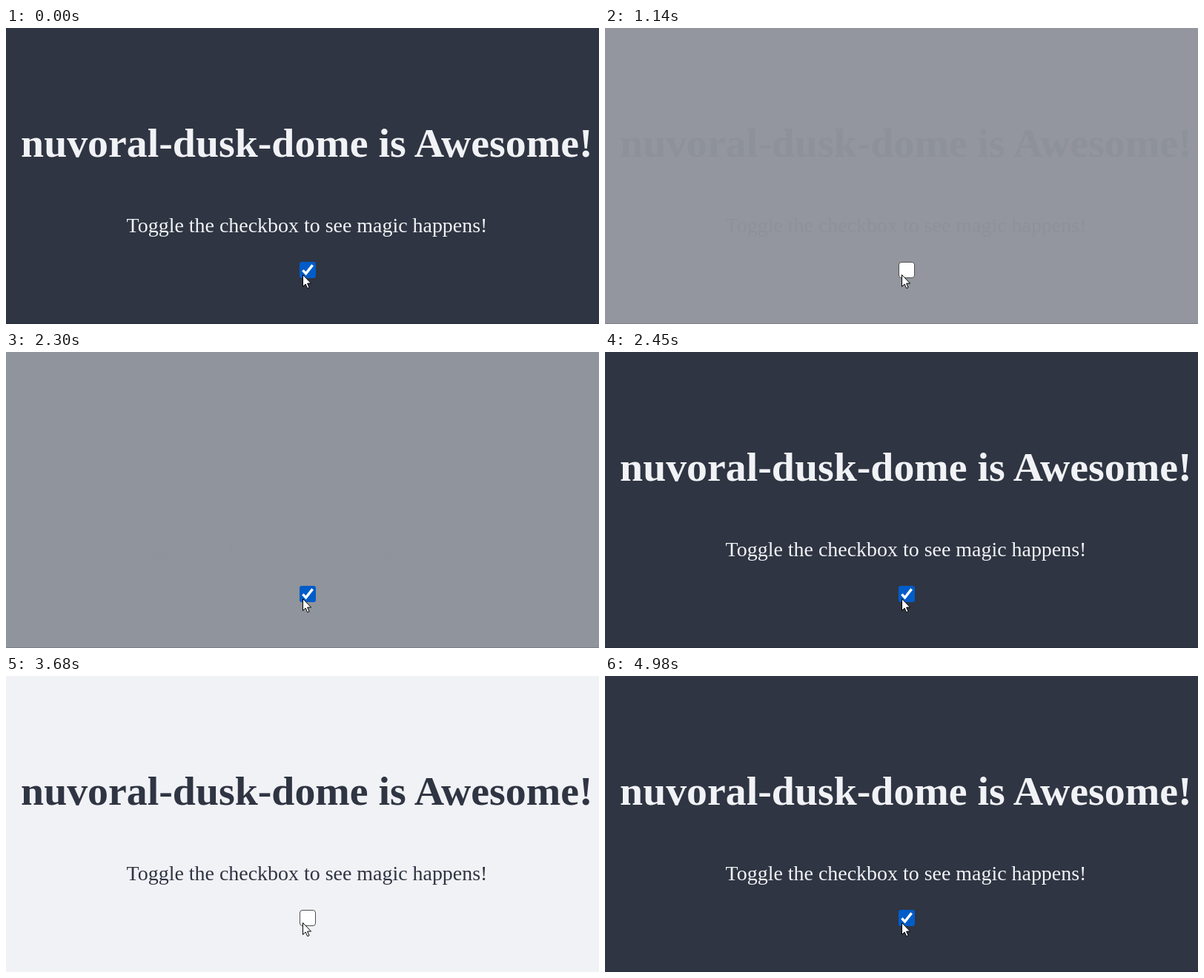
An HTML page that plays this animation: 800x400 px, repeating every 5.82 s.

```html
<!DOCTYPE html>
<html lang="en">
<head>
<meta charset="utf-8">
<title>Dark mode toggle</title>
<style>
  html, body { margin: 0; width: 100%; height: 100%; overflow: hidden; }
  svg { display: block; width: 800px; height: 400px; }
  text { font-family: "Liberation Serif", Times, serif; }
</style>
</head>
<body>
<svg viewBox="0 0 800 400">
  <rect id="page" width="800" height="400"/>
  <rect id="edge" y="399" width="800" height="1" opacity=".15"/>
  <g id="copy">
    <text x="791.6" y="174" font-size="55.85" font-weight="bold" text-anchor="end">nuvoral-dusk-dome is Awesome!</text>
    <text x="406" y="276" font-size="27.95" text-anchor="middle">Toggle the checkbox to see magic happens!</text>
  </g>
  <rect id="empty" x="396.5" y="316.5" width="21" height="21" rx="3.5" stroke="#4f4f4f"/>
  <g id="checked">
    <rect id="fill" x="396" y="316" width="22" height="22" rx="3"/>
    <path d="M400.4 327.4l4.2 4.4L413.6 320.4" fill="none" stroke="#fff" stroke-width="3.4"/>
  </g>
  <g id="press" fill="none">
    <circle cx="401.5" cy="334.5" r="9" stroke="#fff"/>
    <circle cx="401.5" cy="334.5" r="10" stroke="#000"/>
  </g>
  <path d="M400.5 333.5v16l3.6-3.5 2.6 5.7 2.4-1-2.5-5.6h5z" fill="#fff" stroke="#000"/>
</svg>
<script>
const LOOP = 5820, STEP = 30;
const DARK = [47, 53, 66], LIGHT = [241, 242, 246];
// Each click: button down, button up (fade starts), fade done.
const CLICKS = [[870, 992, 1280], [2090, 2150, 2450], [3290, 3360, 3680], [4610, 4680, 4980]];
const el = id => document.getElementById(id);
const show = (id, on) => el(id).setAttribute("visibility", on ? "visible" : "hidden");
const paint = (id, color) => el(id).setAttribute("fill", color);
const mix = (a, b, k) => `rgb(${a.map((v, i) => Math.round(v + (b[i] - v) * k))})`;

function draw(now) {
  const t = now % LOOP;
  const count = CLICKS.filter(c => t >= c[0]).length;
  let pressed = false, fade = 1;
  if (count) {
    const [down, up, done] = CLICKS[count - 1];
    const time = t >= done ? done : down + Math.floor((t - down) / STEP) * STEP;
    pressed = time < up;
    fade = Math.min(1, Math.max(0, (time - up) / (done - up)));
  }
  const toLight = count % 2 === 1;
  const light = toLight ? fade : 1 - fade;
  const isChecked = toLight === pressed;

  paint("page", mix(DARK, LIGHT, light));
  paint("copy", mix(LIGHT, DARK, light));
  paint("empty", pressed ? "#f1f2f6" : "#fff");
  paint("fill", pressed ? "#3793ff" : "#005cc8");
  show("edge", light < 1);
  show("empty", !isChecked);
  show("checked", isChecked);
  show("press", pressed);
}

function tick() {
  draw(performance.now());
  requestAnimationFrame(tick);
}
tick();
</script>
</body>
</html>
```
